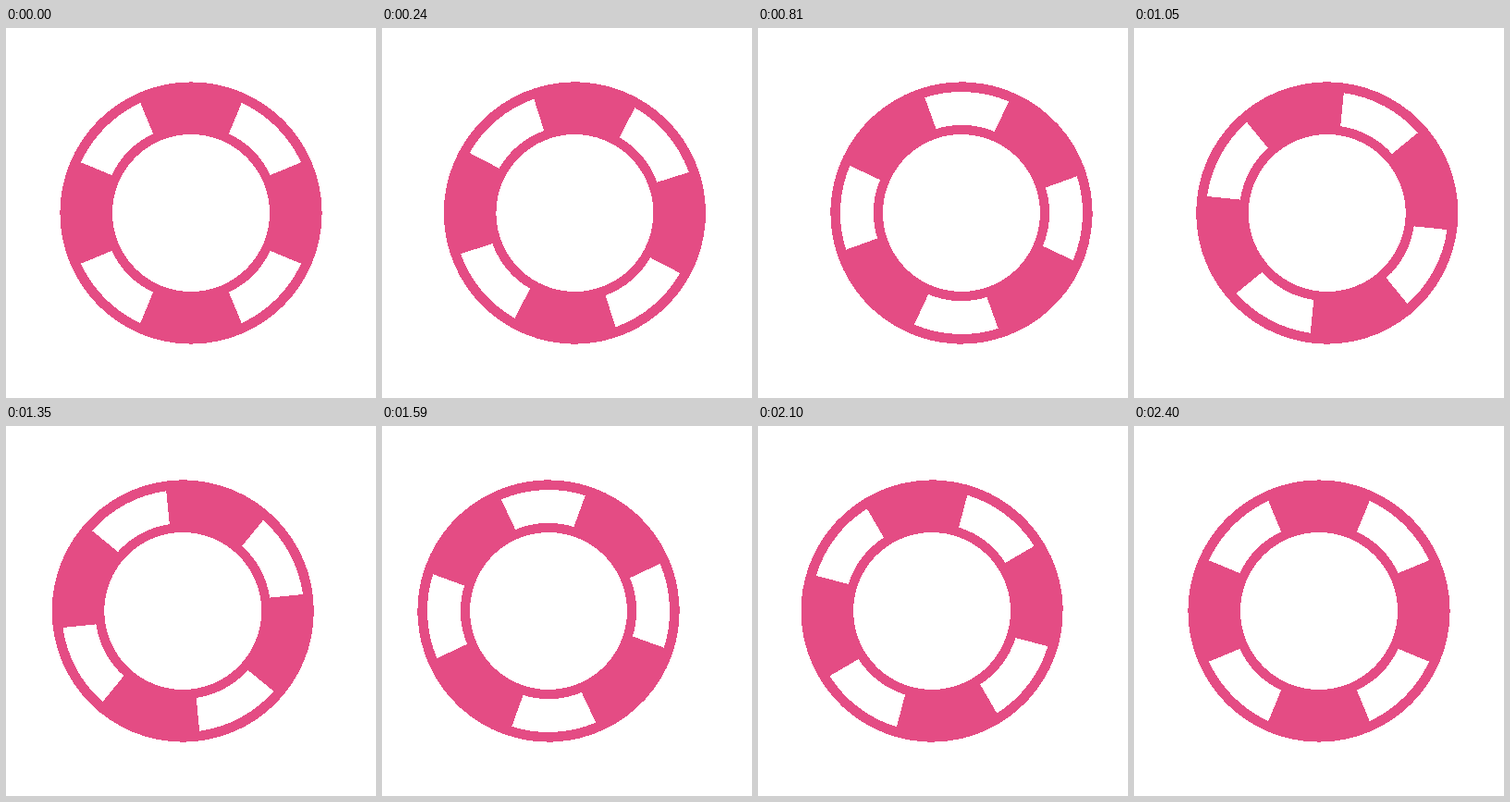
Animation, 400 px wide and 400 px high, one loop 4460 ms. Source, as an HTML page:

```html
<!DOCTYPE html>
<html lang="en">
<head>
<meta charset="utf-8">
<title>Rolling lifebuoy</title>
<style>
  html, body { margin: 0; width: 100%; height: 100%; overflow: hidden; background: #fff; }
  svg { display: block; width: 100%; height: 100%; }
</style>
</head>
<body>
<svg viewBox="0 0 400 400" shape-rendering="crispEdges">
  <path id="buoy" fill="#e44c84" fill-rule="evenodd"/>
</svg>
<script>
const LOOP = 4460, MOVE = 2400, STEP = 30;
const SWAY = 23.85, TURN = 180;
const OUTER = 141.6, INNER = 85, RIM = 131, HUB = 95, GAP = 5;
const buoy = document.getElementById('buoy');

const circle = r => `M${-r} 0A${r} ${r} 0 1 1 ${r} 0A${r} ${r} 0 1 1 ${-r} 0Z`;
const point = (r, a) => `${r * Math.sin(a)} ${-r * Math.cos(a)}`;

// A white panel whose straight sides run parallel to the spokes, GAP away.
function panel(middle) {
  const half = r => Math.PI / 8 - Math.asin(GAP / r);
  const o = half(RIM), i = half(HUB);
  return `M${point(RIM, middle - o)}A${RIM} ${RIM} 0 0 1 ${point(RIM, middle + o)}` +
         `L${point(HUB, middle + i)}A${HUB} ${HUB} 0 0 0 ${point(HUB, middle - i)}Z`;
}

const panels = [1, 3, 5, 7].map(k => panel(k * Math.PI / 4));
buoy.setAttribute('d', circle(OUTER) + circle(INNER) + panels.join(''));

const ease = x => x * x * (3 - 2 * x);

// Right, across to the left, then back to the middle.
function sway(p) {
  if (p < 0.25) return ease(p * 4);
  if (p < 0.75) return 1 - 2 * ease(p * 2 - 0.5);
  return ease(p * 4 - 3) - 1;
}

function draw(now) {
  const t = Math.floor(now % LOOP / STEP) * STEP;
  const p = Math.min(t / MOVE, 1);
  const x = 200 + SWAY * sway(p);
  buoy.setAttribute('transform', `translate(${x} 200) rotate(${TURN * ease(p)})`);
}

let start;
function tick(now) {
  start ??= now;
  draw(now - start);
  requestAnimationFrame(tick);
}
draw(0);
requestAnimationFrame(tick);
</script>
</body>
</html>
```
